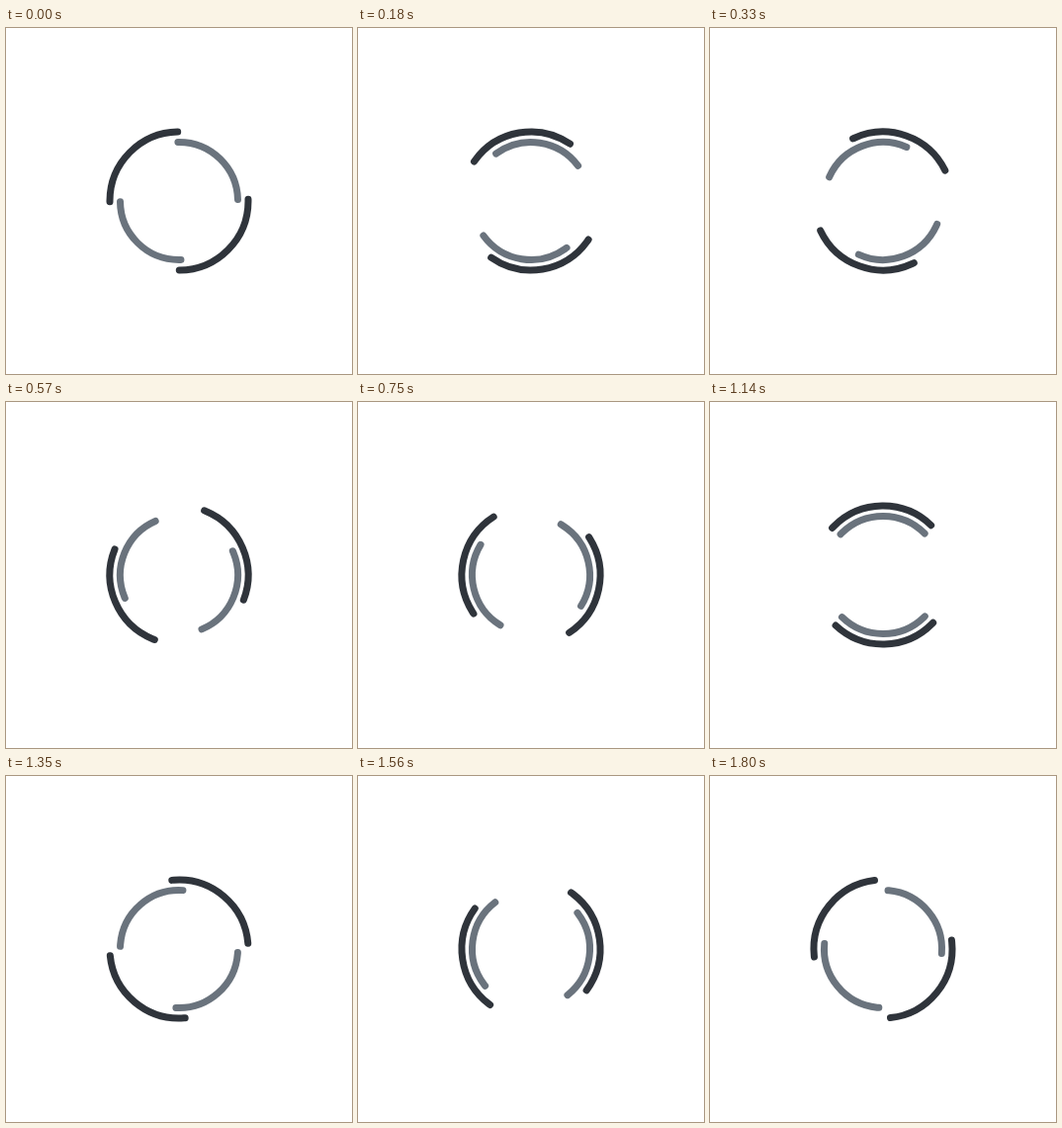
Write an HTML page that moves like this. It is 350 px wide and 350 px high and loops after 1830 ms.

```html
<!DOCTYPE html>
<html lang="en">
<head>
<meta charset="utf-8">
<title>Double ring spinner</title>
<style>
  html, body { margin: 0; height: 100%; overflow: hidden; background: #fff; }
  svg { display: block; width: 100vw; height: 100vh; }
  circle { fill: none; stroke-width: 2; stroke-linecap: round; stroke-dasharray: 1; }
</style>
</head>
<body>
<svg viewBox="-50 -50 100 100">
  <!-- a path length of 4 makes each dash a quarter turn -->
  <circle id="outer" r="20" pathLength="4" stroke="#2f343b"/>
  <circle id="inner" r="17" pathLength="4" stroke="#6a737d"/>
</svg>
<script>
  const LOOP = 1830;
  const outer = document.getElementById('outer');
  const inner = document.getElementById('inner');
  const turn = (ring, deg) => ring.setAttribute('transform', `rotate(${deg})`);

  function draw(now) {
    const angle = (now % LOOP) / LOOP * 360;
    turn(outer, angle);
    turn(inner, 90 - angle);
  }

  const start = performance.now();
  function tick() {
    draw(performance.now() - start);
    requestAnimationFrame(tick);
  }
  tick();
</script>
</body>
</html>
```
